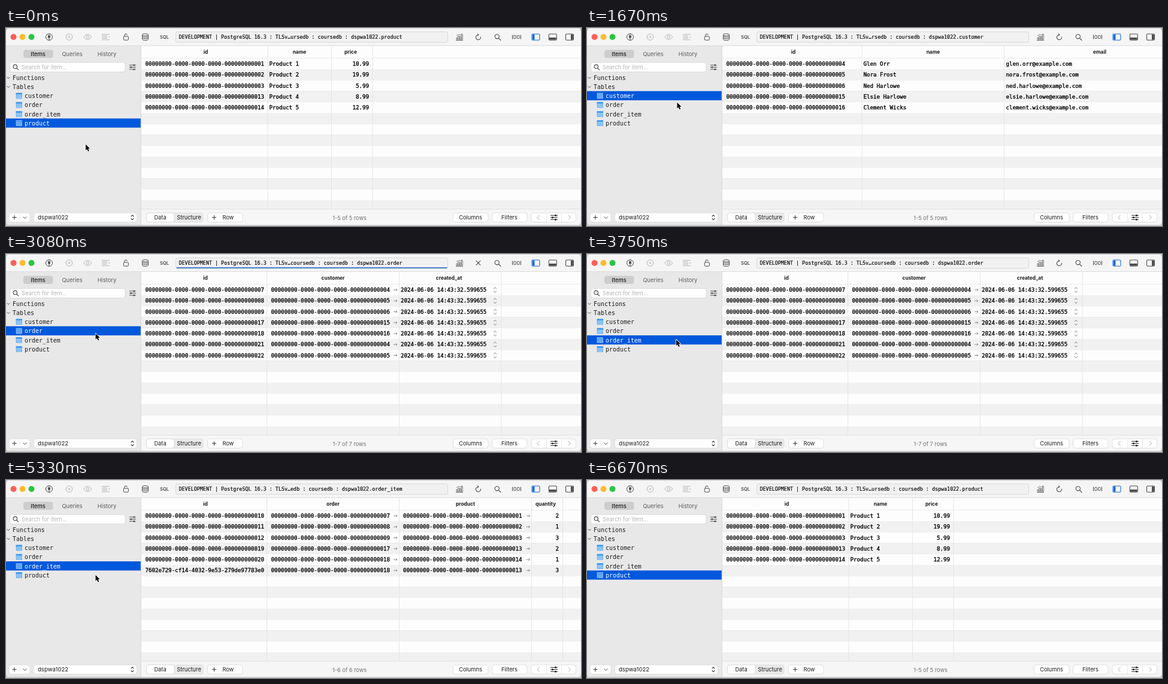
Write an HTML page with a canvas that moves like this. It is 960 px wide and 331 px high and loops after 6830 ms.

```html
<!DOCTYPE html>
<html lang="en">
<head>
<meta charset="utf-8">
<title>Table browser</title>
<style>
html, body { margin: 0; width: 100%; height: 100%; overflow: hidden; background: #d2d2d2; }
canvas { display: block; width: 960px; height: 331px; }
</style>
</head>
<body>
<canvas id="stage"></canvas>
<script>
const W = 960, H = 331, LOOP = 6830, TICK = 1000 / 12;
const MONO = '"DejaVu Sans Mono", "Noto Sans Mono", monospace';
const SANS = 'Inter, Roboto, sans-serif';
const BLUE = '#0058dc', INK = '#1c1c1c', ICON = '#4b4b4b', DIM = '#b4b4b4';

const canvas = document.getElementById('stage');
const c = canvas.getContext('2d');
const dpr = window.devicePixelRatio || 1;
canvas.width = W * dpr;
canvas.height = H * dpr;

// ---- data ----
const uid = n => '00000000-0000-0000-0000-' + String(n).padStart(12, '0');
const STAMP = '2024-06-06 14:43:32.599655';
const people = ['Glen Orr', 'Nora Frost', 'Ned Harlowe', 'Elsie Harlowe', 'Clement Wicks'];
const mail = name => name.toLowerCase().replace(' ', '.') + '@example.com';

// col: title, title centre, text x, right edge, optional right alignment or trailing mark
const col = (title, mid, x, edge, extra) => ({ title, mid, x, edge, ...extra });
const tables = {
  customer: {
    cols: [col('id', 344.5, 232.5, 459), col('name', 578, 461.5, 696.5), col('email', 856, 699.5, 0)],
    rows: [4, 5, 6, 15, 16].map((n, i) => [uid(n), people[i], mail(people[i])])
  },
  order: {
    cols: [col('id', 333, 232.5, 435.5), col('customer', 546, 442.5, 656.5, { arrow: 650 }),
      col('created_at', 739.5, 659, 827, { step: 816.5 })],
    rows: [[7, 4], [8, 5], [9, 6], [17, 15], [18, 16], [21, 4], [22, 5]]
      .map(([a, b]) => [uid(a), uid(b), STAMP])
  },
  order_item: {
    cols: [col('id', 333, 232.5, 435.5), col('order', 546, 442.5, 656.5, { arrow: 650 }),
      col('product', 767, 663, 877.5, { arrow: 871.5 }), col('quantity', 901, 923, 929.5, { right: true })],
    rows: [[10, 7, 1, 2], [11, 8, 2, 1], [12, 9, 3, 3], [19, 17, 13, 2], [20, 18, 14, 1], [0, 18, 13, 3]]
      .map(([a, b, p, q]) => [a ? uid(a) : '7602e729-cf14-4032-9e53-279de97783e0', uid(b), uid(p), String(q)])
  },
  product: {
    cols: [col('id', 333.5, 232.5, 437), col('name', 490, 439.5, 543.5), col('price', 575.5, 606, 612, { right: true })],
    rows: [[1, '10.99'], [2, '19.99'], [3, '5.99'], [13, '8.99'], [14, '12.99']]
      .map(([n, price], i) => [uid(n), 'Product ' + (i + 1), price])
  }
};
const names = Object.keys(tables);

// Ticks at which a table is picked, shown, and done loading
const visits = [
  { name: 'product', pick: -9, show: -9, done: -1 },
  { name: 'customer', pick: 10, show: 13, done: 18 },
  { name: 'order', pick: 28, show: 31, done: 40 },
  { name: 'order_item', pick: 44, show: 47, done: 54 },
  { name: 'product', pick: 65, show: 68, done: 74 }
];

// Pointer tip: tick, x, y
const path = [[0, 133, 194.5], [1, 133.5, 193], [9, 151.8, 111.5], [17, 151.8, 111.5], [20, 150.5, 124.5],
  [25, 149.6, 132.5], [40, 149.6, 132.8], [43, 149, 143], [53, 148.8, 144.5], [60, 149.5, 158.8],
  [72, 149.5, 159], [76, 140, 334]];

// ---- drawing helpers ----
function text(s, x, y, size, color = INK, font = SANS, align = 'left', weight = 400) {
  c.font = `${weight} ${size}px ${font}`;
  c.textAlign = align;
  c.fillStyle = color;
  c.fillText(s, x, y);
}
// Monospaced text with a slightly heavier stroke
function code(s, x, y, size, align, heft) {
  text(s, x, y, size, '#000', MONO, align);
  c.strokeStyle = '#000';
  c.lineWidth = heft;
  c.strokeText(s, x, y);
}
function rect(x, y, w, h, color) {
  c.fillStyle = color;
  c.fillRect(x, y, w, h);
}
function box(x, y, w, h, r, fill, stroke, lw = 1) {
  c.beginPath();
  c.roundRect(x, y, w, h, r);
  if (fill) { c.fillStyle = fill; c.fill(); }
  if (stroke) { c.strokeStyle = stroke; c.lineWidth = lw; c.stroke(); }
}
function line(pts, color = ICON, lw = 1) {
  c.beginPath();
  for (let i = 0; i < pts.length; i += 2) c.lineTo(pts[i], pts[i + 1]);
  c.strokeStyle = color;
  c.lineWidth = lw;
  c.stroke();
}
function arc(x, y, r, color = ICON, lw = 1, from = 0, to = Math.PI * 2) {
  c.beginPath();
  c.arc(x, y, r, from, to);
  c.strokeStyle = color;
  c.lineWidth = lw;
  c.stroke();
}
function disc(x, y, r, color) {
  c.beginPath();
  c.arc(x, y, r, 0, Math.PI * 2);
  c.fillStyle = color;
  c.fill();
}
function cross(x, y, r, color, lw) {
  line([x - r, y - r, x + r, y + r], color, lw);
  line([x - r, y + r, x + r, y - r], color, lw);
}
function plus(x, y, r) {
  line([x - r, y, x + r, y], '#333');
  line([x, y - r, x, y + r], '#333');
}
const chevron = (x, y, w, h, color, lw) => line([x - w, y - h / 2, x, y + h / 2, x + w, y - h / 2], color, lw);
function lens(x, y, r, color) {
  arc(x, y, r, color, 1.1);
  line([x + r * .7, y + r * .7, x + r * 1.8, y + r * 1.8], color, 1.2);
}
function sliders(x, y, w, color) {
  [-3.5, 0, 3.5].forEach((dy, i) => {
    line([x - w, y + dy, x + w, y + dy], color, 1);
    disc(x + (i === 1 ? -2.5 : 2.5), y + dy, 1.5, color);
  });
}
function button(x, w, label, mid) {
  box(x + .5, 309, w, 15.5, 4, '#fff', '#d9d9d9', .8);
  if (label) text(label, mid, 320, 9.3, INK, SANS, 'center');
}

// ---- parts ----
function toolbar(table, loading, grow) {
  rect(0, 0, W, 30, '#f6f5f5');
  rect(0, 29, W, 1, '#dcdbdb');
  ['#fe5f57', '#febb2e', '#28c740'].forEach((k, i) => disc(12.5 + i * 15, 15, 5, k));

  arc(72, 15, 5.5);
  box(70, 12.8, 4, 3.6, 1, ICON);
  line([70.8, 11, 70.8, 13]);
  line([73.2, 11, 73.2, 13]);
  line([72, 16, 72, 20]);

  arc(105.5, 15, 5.3, DIM);
  cross(105.5, 15, 2, DIM, 1);

  c.beginPath();
  c.moveTo(129.5, 15);
  c.quadraticCurveTo(136.3, 6, 143, 15);
  c.quadraticCurveTo(136.3, 24, 129.5, 15);
  c.strokeStyle = DIM;
  c.lineWidth = 1;
  c.stroke();
  arc(136.3, 15, 2.2, DIM);

  [13, 9, 9, 9, 13].forEach((w, i) => line([160, 10.5 + i * 2.3, 160 + w, 10.5 + i * 2.3], DIM, .9));
  line([171, 15, 173.5, 15], DIM, 1);

  box(196.3, 14, 8, 6.2, 1, null, ICON);
  c.beginPath();
  c.moveTo(197.8, 14);
  c.lineTo(197.8, 12);
  c.arc(200, 12, 2.2, Math.PI, 0);
  c.strokeStyle = ICON;
  c.stroke();

  c.beginPath();
  c.ellipse(232.5, 11.3, 5, 1.8, 0, 0, Math.PI * 2);
  c.stroke();
  [13.5, 16, 18.8].forEach(y => {
    c.beginPath();
    c.ellipse(232.5, y, 5, 1.8, 0, 0, Math.PI);
    c.stroke();
  });
  line([227.5, 11.3, 227.5, 18.8]);
  line([237.5, 11.3, 237.5, 18.8]);
  text('SQL', 264.5, 18, 7.6, ICON, SANS, 'center', 600);

  box(283.5, 6.5, 454, 17.5, 3, '#f2f1f1', '#d8d7d7');
  const tail = 'coursedb'.slice(table.length - 13);
  code(`DEVELOPMENT | PostgreSQL 16.3 : TLSv…${tail} : coursedb : dspwa1022.${table}`, 288.5, 18, 8.39, 'left', .15);
  if (loading) rect(284.5, 22.3, 452 * grow, 1.7, '#2f6fc4');

  [3, 5.5, 4.5, 8].forEach((h, i) => box(752 + i * 2.8, 19 - h, 2, h, 0, null, ICON, .7));
  line([751, 20.5, 763, 20.5], ICON, .9);
  line([752, 13, 756, 10.5, 758.5, 12, 762, 9], ICON, .7);

  if (loading) cross(788.5, 15, 3.8, ICON, 1.1);
  else {
    arc(788.5, 15.5, 4.1, ICON, 1.1, -.2, Math.PI * 1.55);
    line([786.8, 9, 789.2, 11.3, 786.8, 13.5], ICON, 1);
  }
  lens(819.8, 14.3, 3.6, ICON);

  line([845.5, 11.5, 845.5, 18.5]);
  line([859.5, 11.5, 859.5, 18.5]);
  box(847.8, 12.5, 3.6, 5, .5, null, ICON, .9);
  box(853.6, 12.5, 3.6, 5, .5, null, ICON, .9);

  box(878, 10, 13, 10.3, 1.5, null, '#1769e0', 1.1);
  rect(879, 10.8, 3.5, 8.8, '#1769e0');
  box(906.3, 10, 13, 10.3, 1.5, null, ICON, 1.1);
  rect(907, 16, 11.6, 3.6, ICON);
  box(934.5, 10, 13, 10.3, 1.5, null, ICON, 1.1);
  rect(943, 10.8, 3.8, 8.8, ICON);
}

function tableIcon(x, y, on) {
  box(x, y, 10.4, 9.6, 1, on ? '#8cc2ff' : '#5fadf3');
  rect(x, y, 10.4, 2.6, on ? '#5aa7f8' : '#3c98ee');
  const gap = on ? '#2f78e4' : '#cfe4f8';
  [3, 5.2, 7.4].forEach(d => rect(x, y + d, 10.4, .6, gap));
  [3.1, 6.6].forEach(d => rect(x + d, y + 2.6, .6, 7, gap));
}

function sidebar(picked) {
  rect(0, 30, 225, H, '#e9e8e8');
  box(29, 36.5, 49.5, 13.5, 4, '#cecdcd');
  text('Items', 53.5, 46.6, 9.3, INK, SANS, 'center', 500);
  text('Queries', 110.5, 46.6, 9.3, '#5c5c5c', SANS, 'center');
  text('History', 168.5, 46.6, 9.3, '#5c5c5c', SANS, 'center');
  box(6.5, 57.5, 192.5, 16, 4, '#fff', '#d4d4d4', .8);
  lens(15.3, 64.6, 3.2, '#444');
  text('Search for item...', 26, 69, 9.4, '#b5b5b5');
  sliders(211.3, 65.5, 5.5, '#555');

  ['Functions', 'Tables'].forEach((s, i) => {
    const y = 83.2 + i * 15.2;
    chevron(4, y, 2.3, 2.6, '#555', 1);
    text(s, 11, y + 3.5, 9.95, INK, MONO);
  });
  names.forEach((name, i) => {
    const y = 105.5 + i * 15.25, on = name === picked;
    if (on) rect(0, y, 225, 15.3, BLUE);
    tableIcon(16.6, y + 3.1, on);
    text(name, 31, y + 11.6, 9.95, on ? '#fff' : INK, MONO);
  });

  button(4.5, 35, '');
  plus(14, 316.7, 3.6);
  rect(22.5, 311.5, .8, 10.5, '#ddd');
  chevron(31.5, 317, 3, 3, '#444', 1);
  button(46, 172, '');
  text('dspwa1022', 53, 320.2, 9.6);
  line([208.7, 315.2, 211, 312.9, 213.3, 315.2], '#333', 1.1);
  line([208.7, 318.4, 211, 320.7, 213.3, 318.4], '#333', 1.1);
}

function grid(name) {
  const { cols, rows } = tables[name];
  rect(225, 30, W, 21, '#fdfdfd');
  for (let i = 0; i < 14; i++) rect(225, 50.75 + i * 18.25, W, 18.25, i % 2 ? '#f1f1f1' : '#fdfdfd');
  rect(225, 50, W, .8, '#e6e6e6');
  for (const k of cols) {
    if (k.edge) rect(k.edge - .5, 30, 1, 273, '#e5e5e5');
    text(k.title, k.mid, 42.7, 8.4, INK, SANS, 'center', 700);
  }
  rows.forEach((row, i) => {
    const y = 60 + i * 18.25;
    row.forEach((s, j) => {
      const k = cols[j];
      code(s, k.x, y + 3, 9.16, k.right ? 'right' : 'left', .35);
      if (k.arrow) {
        line([k.arrow - 3, y, k.arrow + 3, y], '#777', .8);
        line([k.arrow + .8, y - 2, k.arrow + 3, y, k.arrow + .8, y + 2], '#777', .8);
      }
      if (k.step) {
        line([k.step - 2.3, y - 2, k.step, y - 4.2, k.step + 2.3, y - 2], '#666', .9);
        line([k.step - 2.3, y + 2, k.step, y + 4.2, k.step + 2.3, y + 2], '#666', .9);
      }
    });
  });
}

function footer(count) {
  rect(225, 302.5, W, H, '#f6f6f6');
  rect(225, 302.5, W, .9, '#dedede');
  box(234.5, 309, 94.5, 15.5, 4, '#e9e9e9', '#dcdcdc', .8);
  button(234, 46.5, 'Data', 257.5);
  text('Structure', 305.5, 320, 9.3, INK, SANS, 'center');
  button(336, 58.5, 'Row', 371);
  plus(347.5, 316.7, 3.6);
  text(`1-${count} of ${count} rows`, 573.5, 320.5, 9.2, '#707070', SANS, 'center');
  button(746, 58.5, 'Columns', 775.5);
  button(811, 58.5, 'Filters', 840.5);
  button(876.5, 74.5, '');
  rect(902, 309.5, .8, 14.5, '#e2e2e2');
  rect(927, 309.5, .8, 14.5, '#e2e2e2');
  line([890.5, 313, 887, 316.7, 890.5, 320.4], '#aaa', 1);
  line([939, 313, 942.5, 316.7, 939, 320.4], '#aaa', 1);
  sliders(915, 316.7, 6, '#222');
}

function pointer(k) {
  const n = path.findIndex(p => p[0] > k);
  if (n < 0) return;
  const [k0, x0, y0] = path[n - 1], [k1, x1, y1] = path[n];
  const u = (k - k0) / (k1 - k0), e = u * u * (3 - 2 * u);
  c.save();
  c.translate(x0 + (x1 - x0) * e, y0 + (y1 - y0) * e);
  c.beginPath();
  [[0, 0], [0, 10], [2.3, 8], [4, 11.8], [5.8, 11], [4.1, 7.3], [7.1, 7.1]].forEach(p => c.lineTo(...p));
  c.closePath();
  c.lineJoin = 'round';
  c.strokeStyle = '#fff';
  c.lineWidth = 1.6;
  c.stroke();
  c.fillStyle = '#000';
  c.fill();
  c.restore();
}

function draw(k) {
  const last = key => visits.filter(v => v[key] <= k).pop();
  const picked = last('pick'), shown = last('show');
  c.setTransform(dpr, 0, 0, dpr, 0, 0);
  rect(0, 0, W, H, '#cfcfcf');
  c.save();
  c.beginPath();
  c.roundRect(0, 0, W, 330, 7);
  c.clip();
  grid(shown.name);
  footer(tables[shown.name].rows.length);
  sidebar(picked.name);
  rect(224.8, 30, .9, 300, '#d3d3d3');
  toolbar(shown.name, k < shown.done, Math.min(1, (k - shown.show + 1) / 3));
  rect(0, 0, W, .7, '#c8c8c8');
  rect(0, 329.3, W, .7, '#bdbdbd');
  c.restore();
  pointer(k);
}

let start = null;
function loop(now) {
  if (start === null) start = now;
  draw(Math.floor(((now - start) % LOOP + 4) / TICK));
  requestAnimationFrame(loop);
}
draw(0);
requestAnimationFrame(loop);
</script>
</body>
</html>
```
